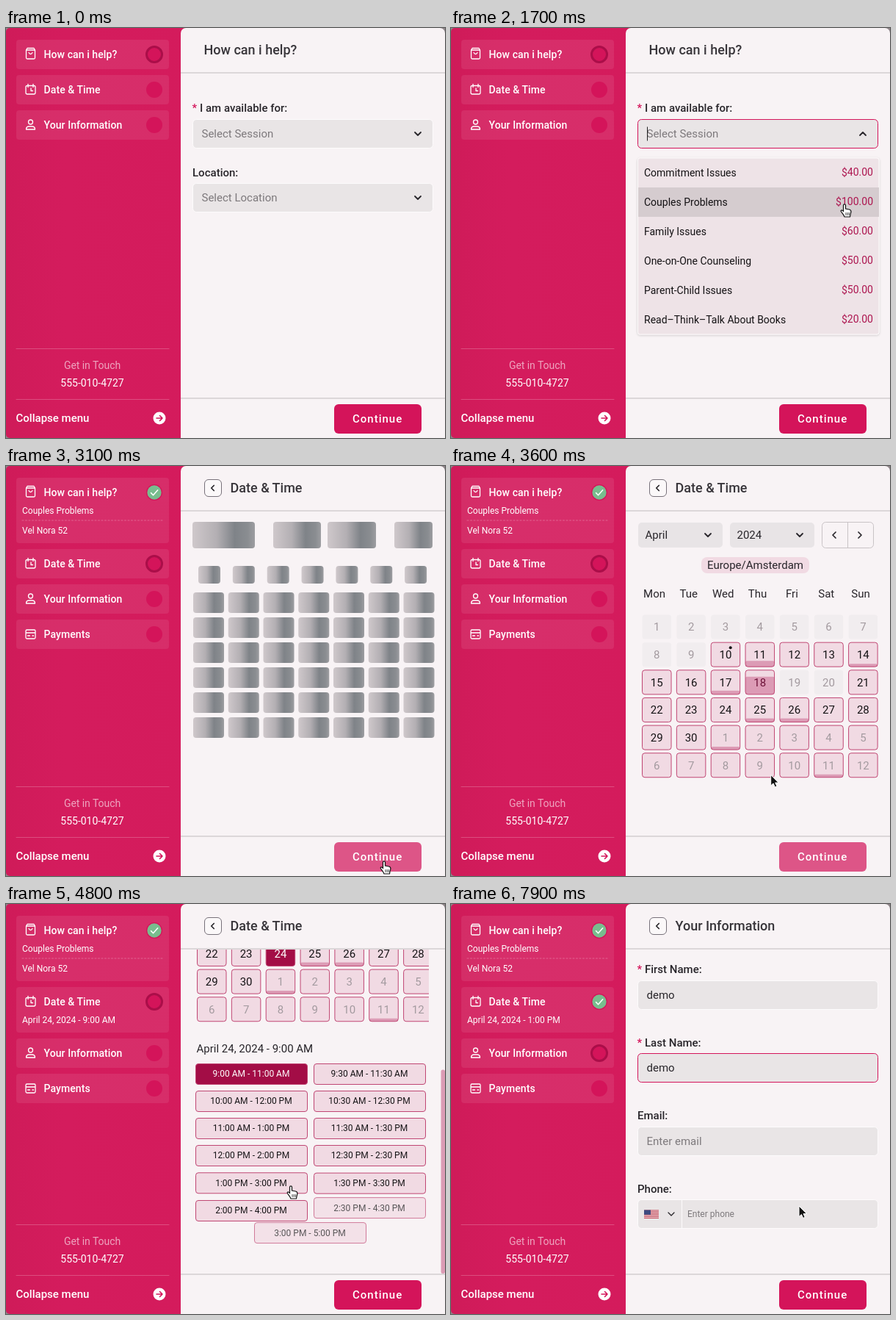
These frames come from a looping animation (598 by 558 pixels, 8 s). An HTML page:

```html
<!DOCTYPE html>
<html lang="en">
<head>
<meta charset="utf-8">
<title>Booking form</title>
<style>
html, body { margin: 0; width: 100%; height: 100%; overflow: hidden; }
svg { display: block; width: 598px; height: 558px; font-family: Roboto, sans-serif; }
text { white-space: pre; }
</style>
</head>
<body>
<svg id="stage" viewBox="0 0 598 558"></svg>
<script>
const LOOP = 8000;
const PINK = '#d4145a', DARK = '#a30d46', INK = '#28252a', MUTED = '#7d797c', PAPER = '#f8f3f5';
const PLACE = 'Vel Nora 52', PHONE = '555-010-4727';

// ---- markup helpers ----
const at = o => Object.entries(o).map(([k, v]) => ` ${k}="${v}"`).join('');
const rect = (x, y, w, h, rx, fill, o = {}) =>
  `<rect${at({ x, y, width: w, height: h, rx, fill, ...o })}/>`;
const line = (d, stroke, width = 1, o = {}) =>
  `<path${at({ d, fill: 'none', stroke, 'stroke-width': width, 'stroke-linecap': 'round', 'stroke-linejoin': 'round', ...o })}/>`;
// y is the middle of the capitals
const text = (x, y, str, size = 15, fill = INK, o = {}) =>
  `<text${at({ x, y: y + size * .355, 'font-size': size, fill, ...o })}>${str}</text>`;
const group = (id, body, o = {}) => `<g${at({ id, ...o })}>${body}</g>`;
const bold = { 'font-weight': 500 };
const mid = { 'text-anchor': 'middle' };
const chevron = (x, y, up, w = 1.8) =>
  line(`M${x - 4} ${y + (up ? 2 : -2)}l4 ${up ? -4 : 4} 4 ${up ? 4 : -4}`, INK, w);
const arrowhead = (x, y, dir, r = 4) => line(`M${x - dir * r / 2} ${y - r}l${dir * r} ${r} ${-dir * r} ${r}`, INK, 1.7);

// ---- sidebar ----
const icons = [
  'M27.5 30h12v10.5q0 1.500-1.500 1.500h-9q-1.500 0-1.500-1.500zl1.500-2.500h9l1.500 2.500M31 33.500q2.500 4 5 0',
  'M29 30.500h9q2 0 2 2v7.500q0 2-2 2h-9q-2 0-2-2v-7.500q0-2 2-2zM30 28.500v4M37 28.500v4M34 34v3.500h2.500',
  'M33.500 29a3 3 0 1 1 0 6a3 3 0 1 1 0-6zM27.500 42q0-4 4-4h4q4 0 4 4z',
  'M28.500 30h10q1.500 0 1.500 1.500v9q0 1.500-1.500 1.500h-10q-1.500 0-1.500-1.500v-9q0-1.500 1.500-1.500zM27 34h13M29.500 38h3M36 38h1.500'
];
const names = ['How can i help?', 'Date &amp; Time', 'Your Information', 'Payments'];
const sub = (id, y, str) => text(22, y, str, 12, '#fff', { id });

const card = i => group('card' + i,
  rect(14, 0, 208, 40, 4, '#fff', { id: 'box' + i, 'fill-opacity': .08 }) +
  line(icons[i], '#fff', 1.3, { transform: 'translate(0 -16)' }) +
  text(51.500, 20, names[i], 14, '#fff', { ...bold, 'letter-spacing': .08 }) +
  `<circle cx="202" cy="20" r="11" fill="${PINK}"/>` +
  `<circle id="ring${i}" cx="202" cy="20" r="10.5" fill="none" stroke="#ab0e49" stroke-width="3"/>` +
  group('done' + i, '<circle cx="202" cy="20" r="9.700" fill="#78bd8e"/>' +
    line('M197.500 20.500l3 3.200 6.200-7', '#fff', 1.5)) +
  (i == 0 ? sub('pick', 45, 'Couples Problems') + group('place', sub('placeText', 72, PLACE) +
    line('M22 58H215', '#fff', 1, { 'stroke-dasharray': '2 2.500', opacity: .25 })) : '') +
  (i == 1 ? sub('dateSub', 45, '') : ''));

const sidebar = rect(0, 0, 260, 558, 5, 'url(#side)') + [0, 1, 2, 3].map(card).join('') +
  line('M14 436.500H222M14 505.500H222', '#fff', 1, { opacity: .22 }) +
  text(117.500, 459, 'Get in Touch', 14, '#fff', { ...mid, opacity: .6, 'letter-spacing': -.05 }) +
  text(117.500, 483, PHONE, 14, '#fff', mid) +
  text(13.500, 531, 'Collapse menu', 15, '#fff', bold) +
  '<circle cx="209" cy="531" r="8.500" fill="#fff"/>' + line('M205 531h8m-3.500-3.500l3.500 3.500-3.500 3.500', PINK, 1.6);

// ---- form pages ----
const field = (id, c) => rect(254.5, c - 19.5, 327, 39, 5, '#e9e5e6', { id, stroke: '#fdfbfc' });
const label = (y, str, must) => (must ? text(253.5, y, '*', 15, PINK, bold) : '') +
  text(must ? 264 : 254, y, str, 15, INK, bold);
const hint = (id, y, str = '') => text(266.5, y, str, 15, MUTED, { id });

const options = [['Commitment Issues', 40], ['Couples Problems', 100], ['Family Issues', 60],
  ['One-on-One Counseling', 50], ['Parent-Child Issues', 50], ['Read–Think–Talk About Books', 20]];
const sheet = (y, h) => rect(254.5, y, 328.5, h, 3, '#eee3e7', { stroke: '#fdfafb', filter: 'url(#soft)' });

const pageHelp = group('page0',
  label(109, 'I am available for:', true) + field('session', 144) + hint('sessionText', 144) +
  group('down0', chevron(561, 144)) + group('up0', chevron(561, 144, true)) +
  label(197, 'Location:') + field('location', 231) + hint('locationText', 231) +
  group('down1', chevron(561, 231)) + group('up1', chevron(561, 231, true)) +
  group('menu0', sheet(177, 240) + rect(255, 217, 328, 40, 0, '#d5cccf', { id: 'hover0' }) +
    options.map(([name, cost], i) => text(263, 197 + i * 40, name, 14, '#151315') +
      text(575, 196 + i * 40, `$${cost}.00`, 14, '#ad1650', { 'text-anchor': 'end' })).join('')) +
  group('menu1', sheet(264, 40) + rect(255, 264.5, 328, 39, 0, '#d5cccf', { id: 'hover1' }) +
    text(263, 284, PLACE, 14, '#151315')));

const stripes = Array.from({ length: 7 }, (_, i) => rect(0, i * 1.75, 20, .9, 0, '#c0394b')).join('');
const pageInfo = group('page2',
  label(89, 'First Name:', true) + field('first', 124) + hint('firstText', 124) +
  label(189, 'Last Name:', true) + field('last', 223) + hint('lastText', 223) +
  label(288, 'Email:') + field('email', 323) + hint('emailText', 323, 'Enter email') +
  label(388, 'Phone:') + field('phone', 422) + line('M314.500 403V441', '#fdfbfc') +
  group('flag', rect(0, 0, 20, 12, 0, '#f1e9ea') + stripes + rect(0, 0, 9, 6.3, 0, '#3c4a80'),
    { transform: 'translate(263 416.500)' }) +
  chevron(300, 422, false, 1.3) + text(322, 422, 'Enter phone', 12, MUTED));

// ---- calendar page ----
const bone = (x, y, w, h) => rect(x, y, w, h, 4, 'url(#shine)');
let bones = [[254, 85], [364, 65], [438, 66], [529, 52]].map(([x, w]) => bone(x, 76, w, 36)).join('');
for (let i = 0; i < 7; i++) {
  bones += bone(262 + i * 46.85, 136, 30, 24);
  for (let r = 0; r < 6; r++) bones += bone(255 + i * 47.75, 172 + r * 34, 42, 28);
}

const COL = 46.85, ROW = 37.65;
const closed = n => n < 10 || n == 19 || n == 20;
const booked = { 11: 8, 14: 4, 17: 5, 18: 24, 25: 5, 26: 5, 31: 4, 41: 4 };
const day = n => {
  const x = 260.5 + (n - 1) % 7 * COL, y = 189.5 + Math.floor((n - 1) / 7) * ROW;
  const next = n > 30, off = closed(n), cut = booked[n], w = 39.500, h = 33;
  const ink = off || next ? '#a39a9f' : n == 18 ? '#6d1238' : '#151315';
  return rect(x, y, w, h, 3.5, off ? '#f1edef' : '#f1dae3', n == 24 ? { id: 'day24' } : {}) +
    (cut ? rect(x, y + h - cut, w, cut, 2, '#dc9bb5') : '') +
    (off ? '' : rect(x, y, w, h, 3.5, 'none', { stroke: '#c04673' })) +
    (n == 10 ? `<circle cx="${x + 26.5}" cy="${y + 7}" r="2" fill="#151315"/>` : '') +
    text(x + w / 2, y + h / 2, next ? n - 30 : n, 15, ink, n == 24 ? { ...mid, id: 'text24' } : mid);
};
const clock = m => `${(Math.floor(m / 60) + 11) % 12 + 1}:${m % 60 ? '30' : '00'} ${m < 720 ? 'AM' : 'PM'}`;
const slot = i => {
  const x = i == 12 ? 338.5 : i % 2 ? 419.5 : 258.5, y = 468.5 + Math.floor(i / 2) * 37, m = 540 + i * 30;
  return group('slot' + i, rect(x, y, 152, 28, 3.5, '#f1dae3', { stroke: '#c04673', id: 'slotBox' + i }) +
    text(x + 75.5, y + 13.7, `${clock(m)} - ${clock(m + 120)}`, 12, '#151315', { ...mid, id: 'slotText' + i }));
};
const picker = (x, str) => rect(x, 64, 115, 34, 5, '#e8e4e6') + text(x + 9.5, 81, str) + chevron(x + 95, 81);
const calendar = picker(255, 'April') + picker(380, '2024') +
  rect(505.5, 63.5, 70, 35, 5, 'none', { stroke: '#c9c3c6' }) + line('M540.500 64V98', '#c9c3c6') +
  arrowhead(522, 81, -1) + arrowhead(557, 81, 1) +
  rect(341, 111, 147, 22, 8, '#f1dae3') + text(414.5, 122, 'Europe/Amsterdam', 15, INK, mid) +
  ['Mon', 'Tue', 'Wed', 'Thu', 'Fri', 'Sat', 'Sun'].map((d, i) => text(277 + i * COL, 161, d, 15, INK, mid)).join('') +
  Array.from({ length: 42 }, (_, i) => day(i + 1)).join('') +
  group('times', text(259.5, 448, '', 15, INK, { id: 'dateTitle' }) +
    Array.from({ length: 13 }, (_, i) => slot(i)).join(''));
const pageDate = group('page1', group('bones', bones) +
  group('cal', `<g clip-path="url(#view)">${group('scroll', calendar)}</g>` +
    rect(592.500, 61, 5.500, 0, 2.5, '#dc9bb5', { id: 'thumb' })));

// ---- frame, cursors ----
const chrome = rect(238, 60, 360, 2, 0, '#dcd7d9') +
  group('back', rect(270.5, 18.5, 23, 23, 5.5, '#fbf8f9', { stroke: '#77717a' }) + arrowhead(281.500, 30, -1, 3.5)) +
  text(0, 30, '', 18, '#38353a', { ...bold, id: 'title' }) +
  rect(238, 504, 360, 54, 0, PAPER) + rect(238, 503, 360, 1.8, 0, '#d9d4d6') +
  rect(447, 512, 119, 40, 6, PINK, { id: 'button' }) +
  text(472, 532, 'Continue', 15, '#fff', { ...bold, 'letter-spacing': 1 });

const pointers = group('arrow', `<path d="M0 0V14.500L3.400 11.500 5.700 16.500 8.200 15.300 6 10.600H10.500Z" fill="#111" stroke="#fff" stroke-width="1"/>`) +
  group('hand', `<path d="M-1.500 1.200c0-1.800 3-1.800 3 0V6l5 1c2 .5 2.700 1.500 2.400 3.500L8 14 7.500 17H0C-1 14-3 12-4.500 10c-1-1.500.5-2.600 1.800-1.600L-1.500 9.500Z" fill="#fff" stroke="#111" stroke-width="1.2"/>` +
    line('M2 11.500v3M4.200 11.500v3M6.300 11.500v3', '#111', .8)) +
  group('beam', line('M-2.500-7.500Q0-7.500 0-5.500Q0-7.500 2.500-7.500M0-6V6M-2.500 7.500Q0 7.500 0 5.500Q0 7.500 2.500 7.500M-1.500 3h3', '#111', 1.2));

const stage = document.getElementById('stage');
stage.innerHTML = `<defs>
  <linearGradient id="side"><stop stop-color="#cf1b59"/><stop offset=".3" stop-color="#d41c5d"/><stop offset="1" stop-color="#d41b5c"/></linearGradient>
  <linearGradient id="shine" x1="0" x2="1.300" spreadMethod="repeat"><stop stop-color="#cfc8cb"/><stop offset=".3" stop-color="#b3afb3"/>
    <stop offset=".52" stop-color="#7f8388"/><stop offset=".68" stop-color="#8a8d91"/><stop offset="1" stop-color="#cfc8cb"/></linearGradient>
  <filter id="soft" x="-5%" y="-10%" width="110%" height="125%"><feDropShadow dx="0" dy="1" stdDeviation="1.500" flood-opacity=".18"/></filter>
  <clipPath id="view"><rect id="viewBox" x="238" y="62" width="360" height="441"/></clipPath></defs>` +
  rect(0, 0, 598, 558, 0, '#8f8589') + sidebar + rect(238, 0, 360, 558, 7, PAPER) +
  pageHelp + pageDate + pageInfo + chrome +
  rect(0, 0, 1, 19, 0, '#222', { id: 'caret' }) + group('pointer', pointers);

// ---- timing ----
const $ = {};
stage.querySelectorAll('[id]').forEach(e => $[e.id] = e);
const set = (id, o) => { for (const k in o) $[id].setAttribute(k, o[k]); };
const show = (id, on) => { $[id].style.display = on ? '' : 'none'; };
const write = (id, str, fill) => { $[id].textContent = str; if (fill) set(id, { fill }); };
const within = (t, a, b) => t >= a && t < b;
const linear = u => u, smooth = u => u * u * (3 - 2 * u);
function track(steps, t, ease = smooth, col = 1) {
  let i = steps.findIndex(s => s[0] > t);
  if (i < 0) return steps[steps.length - 1][col];
  if (i == 0) return steps[0][col];
  const a = steps[i - 1], b = steps[i];
  return a[col] + (b[col] - a[col]) * ease((t - a[0]) / (b[0] - a[0]));
}

const path = [
  [300, 560, 540, 'arrow'], [800, 470, 147, 'hand'], [1050, 470, 147, 'hand'], [1500, 536, 240, 'hand'],
  [1950, 536, 240, 'hand'], [2150, 520, 232, 'hand'], [2280, 520, 232, 'hand'], [2400, 470, 282, 'hand'],
  [2500, 470, 282, 'arrow'], [2800, 515, 538, 'hand'], [3300, 515, 538, 'arrow'], [3850, 376, 332, 'hand'],
  [4050, 376, 332, 'arrow'], [4200, 383, 372, 'arrow'], [4650, 388, 384, 'hand'], [4950, 388, 384, 'arrow'],
  [5200, 515, 538, 'hand'], [5450, 515, 538, 'arrow'], [5800, 414, 106, 'beam'], [6500, 414, 106, ''],
  [7700, 430, 213, 'beam'], [7800, 455, 318, 'arrow'], [7900, 474, 411, 'arrow']
];
const typed = (keys, t) => 'demo'.slice(0, keys.filter(k => t >= k).length);
const fill = (id, value, hintText) => write(id, value || hintText, value ? INK : MUTED);
const focus = (id, on) => set(id, { stroke: on ? PINK : '#fdfbfc' });

function draw(t) {
  const page = t < 3000 ? 0 : t < 5400 ? 1 : 2;

  // sidebar
  const heights = [track([[1950, 40], [2080, 62], [2500, 62], [2630, 89]], t), track([[4050, 40], [4180, 62]], t), 40, 40];
  let y = 16;
  heights.forEach((h, i) => {
    set('card' + i, { transform: `translate(0 ${y})` });
    set('box' + i, { height: h });
    show('ring' + i, i == page);
    show('done' + i, i < page);
    y += h + 8;
  });
  set('card3', { opacity: track([[1950, 0], [2100, 1]], t) });
  show('pick', t >= 2050);
  show('place', t >= 2600);
  const date = `April 24, 2024 - ${t < 4950 ? '9:00 AM' : '1:00 PM'}`;
  write('dateSub', t < 4300 ? '' : date);

  // header and footer
  for (let i = 0; i < 3; i++) show('page' + i, i == page);
  show('back', page > 0);
  $.title.innerHTML = names[page];
  set('title', { x: page ? 305.5 : 269.5 });
  const pale = within(t, 2700, 4300) || within(t, 5130, 5550);
  set('button', { fill: pale ? '#dd5587' : PINK });

  // first page
  const open = [within(t, 950, 1950), within(t, 2250, 2500)];
  open.forEach((on, i) => { show('menu' + i, on); show('up' + i, on); show('down' + i, !on); });
  set('menu0', { opacity: track([[950, 0], [1100, 1]], t) });
  set('menu1', { opacity: track([[2250, 0], [2350, 1]], t) });
  show('hover0', t >= 1400);
  show('hover1', t >= 2370);
  focus('session', within(t, 900, 2200));
  focus('location', within(t, 2200, 2750));
  fill('sessionText', t >= 1950 && 'Couples Problems', 'Select Session');
  fill('locationText', t >= 2500 && PLACE, 'Select Location');

  // calendar
  show('bones', t < 3500);
  show('cal', t >= 3500);
  set('shine', { gradientTransform: `translate(${(t - 3100) / 1500 * 1.3} 0)` });
  const scroll = track([[4120, 0], [4200, 13], [4700, 264]], t);
  const total = track([[4200, 752], [4700, 707]], t), long = t >= 4130;
  set('scroll', { transform: `translate(0 ${13 - scroll})` });
  set('viewBox', { width: long ? 338 : 360 });
  show('thumb', long);
  set('thumb', { y: 60 + scroll * 443 / total, height: 443 * 443 / total });
  set('day24', { fill: t < 4050 ? '#f1dae3' : DARK });
  set('text24', { fill: t < 4050 ? '#151315' : t < 4280 ? '#4d0c28' : '#fff' });
  show('times', t >= 4250);
  write('dateTitle', date);
  const chosen = t < 4950 ? 0 : 8;
  for (let i = 0; i < 13; i++) {
    const age = t - 4300 - i * 35;
    set('slot' + i, {
      transform: `translate(0 ${track([[0, -20], [80, -6], [115, -3], [150, 1], [250, 0]], age, linear)})`,
      opacity: track([[0, 0], [70, .7], [120, .7], [150, 1]], age, linear)
    });
    set('slotBox' + i, { fill: i == chosen ? DARK : '#f1dae3' });
    set('slotText' + i, { fill: i == chosen ? '#fff' : '#151315' });
  }

  // contact page
  const first = typed([6500, 6600, 6700, 6800], t), last = typed([7100, 7200, 7400, 7500], t);
  const onLast = t >= 7000;
  fill('firstText', first, 'Enter first name');
  fill('lastText', last, 'Enter last name');
  focus('first', within(t, 5800, 7000));
  focus('last', onLast);

  // caret
  const value = onLast ? last : first;
  const blink = page == 0 ? within(t, 950, 1450) || within(t, 1650, 1950)
    : within(t, 5850, 6250) || within(t, 6450, 7700);
  show('caret', blink);
  const input = $[onLast ? 'lastText' : 'firstText'];
  set('caret', {
    x: 267 + (page == 2 && value ? input.getComputedTextLength() : 0),
    y: page == 0 ? 134.5 : onLast ? 213.5 : 114.5
  });

  // pointer
  const now = path.filter(p => p[0] <= t).pop();
  for (const kind of ['arrow', 'hand', 'beam']) show(kind, now && now[3] == kind);
  set('pointer', { transform: `translate(${track(path, t, smooth, 1)} ${track(path, t, smooth, 2)})` });
}

const start = performance.now();
function tick() {
  draw((performance.now() - start) % LOOP);
  requestAnimationFrame(tick);
}
tick();
</script>
</body>
</html>
```
